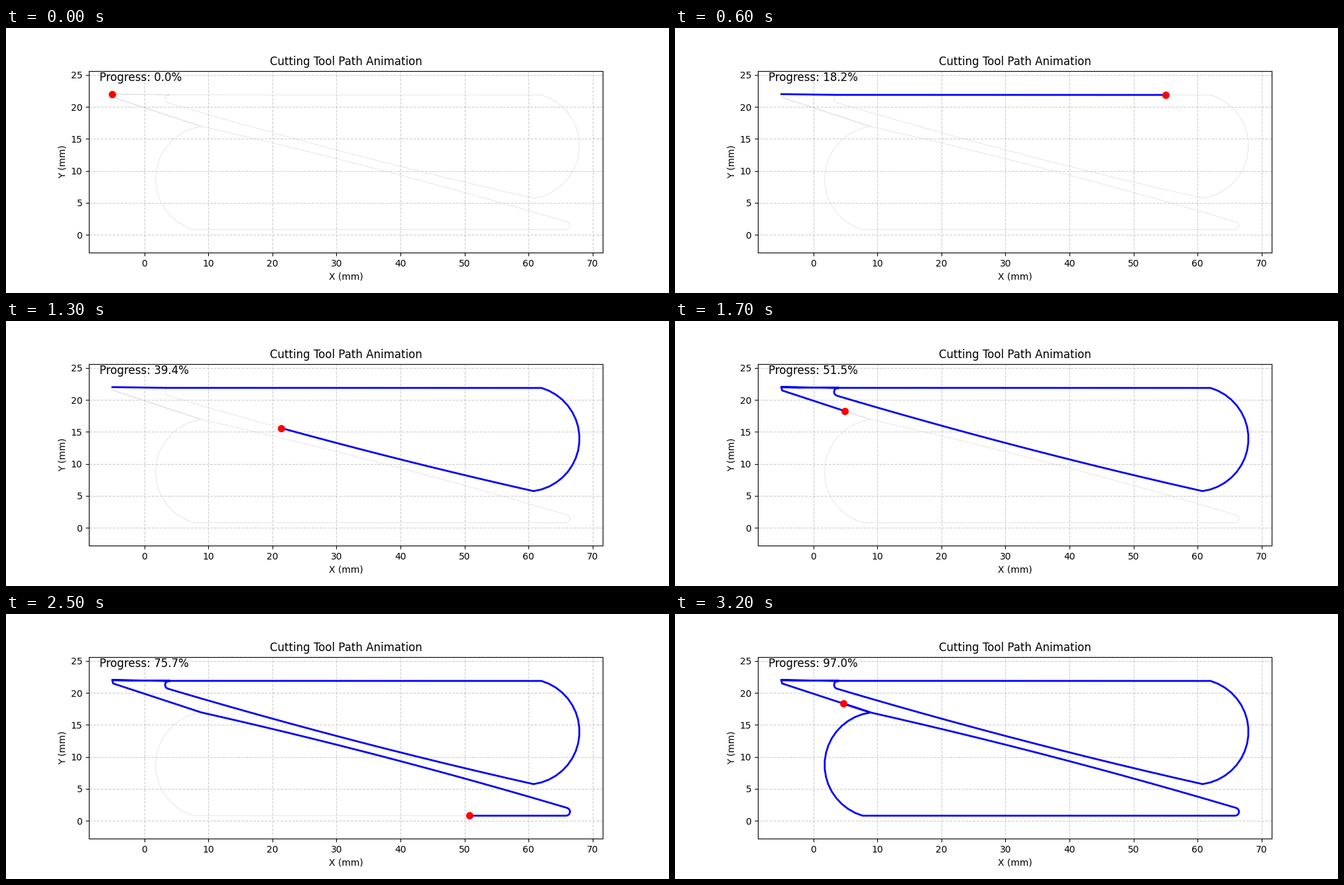
Animation, 1000 px wide and 400 px high, one loop 3300 ms. Source, as a matplotlib script:

```python
import numpy as np
import matplotlib.pyplot as plt
from matplotlib.animation import FuncAnimation

FRAMES = 33
SHARE = 0.030298          # part of the path cut per frame
CENTER = np.array([34.85, 11.34])


def arc(cx, cy, r, start, end, n):
    a = np.radians(np.linspace(start, end, n))
    return np.column_stack([cx + r * np.cos(a), cy + r * np.sin(a)])


def sagging(p, q, sag, n=40):
    t = np.linspace(0, 1, n)
    x = p[0] + (q[0] - p[0]) * t
    y = p[1] + (q[1] - p[1]) * t - 4 * sag * t * (1 - t)
    return np.column_stack([x, y])


def turned(pts):
    """Rotate points half a turn about the centre of the part."""
    return 2 * CENTER - pts


def build_path():
    nose = arc(59.68, 13.94, 8.27, 73.5, -82.35, 19)
    tip = arc(3.85, 21.25, 0.62, 255, 90, 9)
    slope = sagging(nose[-1], tip[0], 0.51)
    return np.vstack([
        [(-5, 22), (3.6, 21.88)],
        nose, slope[1:], tip[1:],
        [(3.95, 21.87), (-5.02, 22), (-4.87, 21.47)],
        turned(slope), turned(tip)[1:],
        turned(nose),
        [(-4.88, 21.48)],
    ])


path = build_path()
dist = np.r_[0, np.cumsum(np.hypot(*np.diff(path, axis=0).T))]


def cut_until(d):
    end = [np.interp(d, dist, path[:, i]) for i in (0, 1)]
    return np.vstack([path[dist < d], end])


fig, ax = plt.subplots(figsize=(10, 4), dpi=100)
ax.set_aspect("equal")
ax.set_xlim(-8.67, 71.58)
ax.set_ylim(-2.81, 25.64)
ax.set_title("Cutting Tool Path Animation")
ax.set_xlabel("X (mm)")
ax.set_ylabel("Y (mm)")
ax.grid(True, linestyle="--", alpha=0.6)

ax.plot(*path.T, color="lightgray", lw=0.5, alpha=0.8)
trace, = ax.plot([], [], "b-", lw=2)
tool, = ax.plot([], [], "ro", ms=7)
label = ax.text(-7.02, 24, "", fontsize=12)


def update(k):
    done = k * SHARE
    pts = cut_until(done * dist[-1])
    trace.set_data(*(pts.T if k else ([], [])))
    tool.set_data(pts[-1:, 0], pts[-1:, 1])
    label.set_text(f"Progress: {100 * done:.1f}%")
    return trace, tool, label


anim = FuncAnimation(fig, update, frames=FRAMES, init_func=lambda: update(0),
                     interval=100, repeat=True, repeat_delay=0)
plt.show()
```
